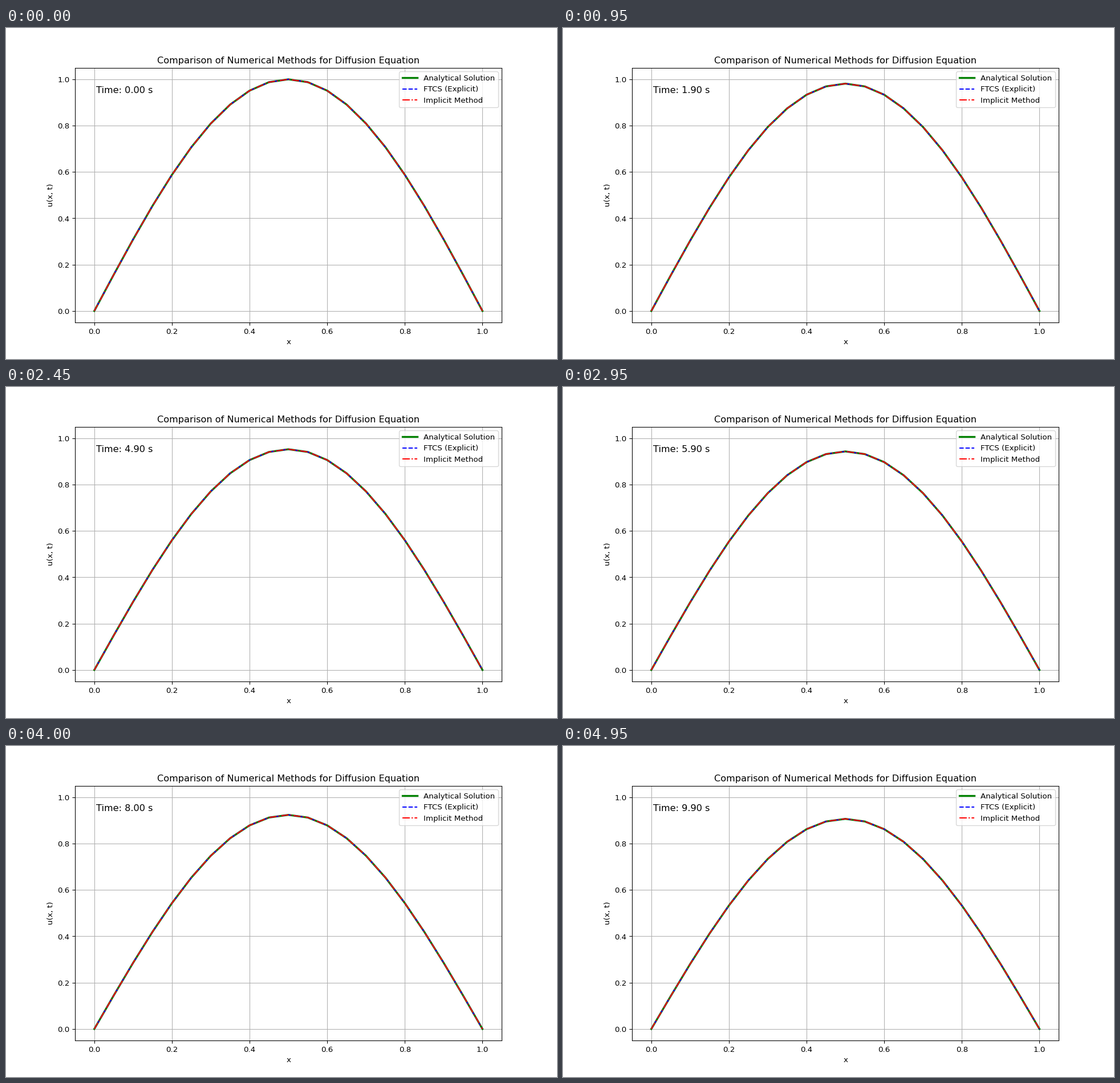
Recreate the animation shown at these times as a matplotlib script. Size 966 px wide and 580 px high, loop 5000 ms.

```python
import numpy as np
import matplotlib.pyplot as plt
from matplotlib.animation import FuncAnimation

DPI = 96.6
WIDTH, HEIGHT = 966, 580
FRAMES, INTERVAL = 100, 50
ALPHA, DX, DT = 0.001, 0.05, 0.1

x = np.linspace(0, 1, 21)
start = np.sin(np.pi * x)

# The sine profile is an eigenvector of both schemes: each step scales it.
decay = 4 * ALPHA * DT / DX**2 * np.sin(np.pi * DX / 2) ** 2


def analytical(step):
    return start * np.exp(-ALPHA * np.pi**2 * step * DT)


def explicit(step):
    return start * (1 - decay) ** step


def implicit(step):
    return start / (1 + decay) ** step


plt.rcParams["font.family"] = "DejaVu Sans"
# The small slack keeps the canvas from being rounded down by a pixel.
size = ((WIDTH + 0.001) / DPI, (HEIGHT + 0.001) / DPI)
fig, ax = plt.subplots(figsize=size, dpi=DPI)

curves = [
    (ax.plot(x, start, "g-", lw=2.5, label="Analytical Solution")[0], analytical),
    (ax.plot(x, start, "b--", lw=1.5, label="FTCS (Explicit)")[0], explicit),
    (ax.plot(x, start, "r-.", lw=1.5, label="Implicit Method")[0], implicit),
]
ax.set_xlim(-0.05, 1.05)
ax.set_ylim(-0.05, 1.05)
ax.set_title("Comparison of Numerical Methods for Diffusion Equation")
ax.set_xlabel("x")
ax.set_ylabel("u(x, t)")
ax.grid(True)
ax.legend(loc="upper right")
clock = ax.text(0.05, 0.9, "", transform=ax.transAxes, fontsize=12)


def update(step):
    for line, solution in curves:
        line.set_ydata(solution(step))
    clock.set_text(f"Time: {step * DT:.2f} s")
    return [line for line, _ in curves] + [clock]


anim = FuncAnimation(fig, update, frames=FRAMES, interval=INTERVAL, repeat=True)
plt.show()
```
